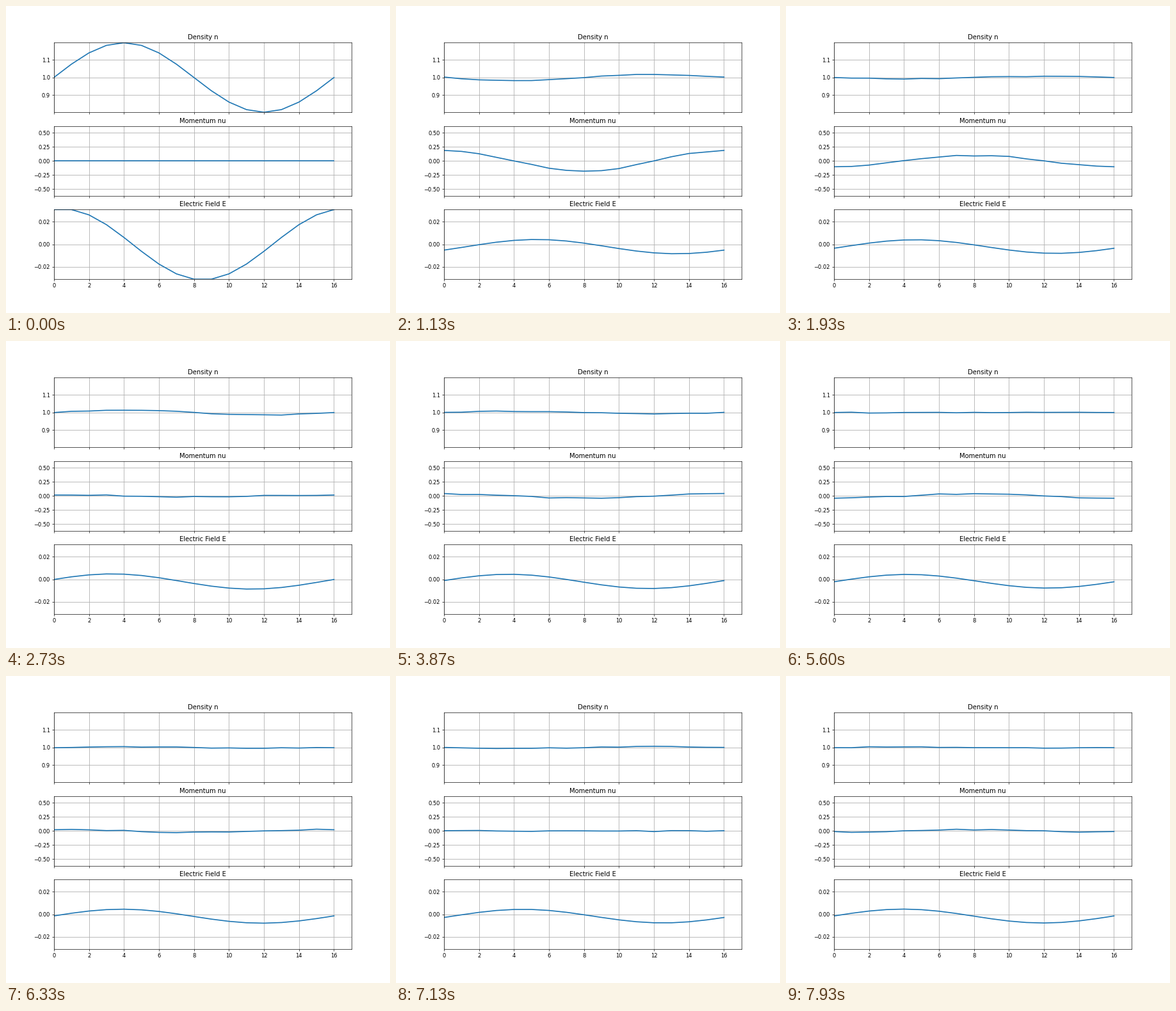
A matplotlib script that plays this animation: 600 by 480 pixels, repeating every 8 s.

```python
import numpy as np
import matplotlib.pyplot as plt
from matplotlib.animation import FuncAnimation

STEPS, LOOP = 120, 8000
SUB = 2                     # drawn frames per time step
CELLS = 16
K = 2 * np.pi / CELLS       # wave number per cell
AMP = 0.1974                # initial density perturbation
RATE = 0.338                # phase mixing per step
V = 5.6                     # edge of the flat velocity distribution
E_RATIO = 0.1598            # field amplitude per density amplitude
W, H, DPI = 600, 480, 60
NUDGE = 0.17                # pixels, keeps grid and frames on their pixel rows

x = np.arange(CELLS + 1)
rng = np.random.default_rng(4)

# particle noise: short waves as (mode, frequency, two phases)
WAVES = [(m, RATE * m * rng.uniform(-1, 1), *rng.uniform(0, 2 * np.pi, 2))
         for m in (2, 3, 4, 5, 6, 7)]


def noise(t, which):
    total = sum(np.sin(m * K * x + w * t + ph[which]) for m, w, *ph in WAVES)
    return total / len(WAVES) * (1 - np.exp(-t / 8))


def state(t):
    """Density, momentum and electric field at step t."""
    z = max(RATE * t, 1e-6)
    a = AMP * np.sin(z) / z
    b = AMP * V * (np.cos(z) - np.sin(z) / z) / z
    n = 1 + a * np.sin(K * x) + 0.004 * noise(t, 0)
    nu = b * np.cos(K * x) + 0.018 * noise(t, 1)
    settled = 1 - np.exp(-(t / 6) ** 2)
    drift = -0.0021 + 0.0006 * t / STEPS
    e = E_RATIO * a * np.cos(K * (x - 0.5))
    e += settled * (drift + 0.0061 * np.sin(K * (x - 0.15)))
    return n, nu, e


fig, axes = plt.subplots(3, 1, sharex=True, figsize=(W / DPI, H / DPI), dpi=DPI)
dx, dy = NUDGE / W, NUDGE / H
fig.subplots_adjust(left=0.125 - dx, right=0.9 - dx,
                    bottom=0.11 + dy, top=0.88 + dy)
panels = [("Density n", 1 - AMP, 1 + AMP),
          ("Momentum nu", -0.6176, 0.6176),
          ("Electric Field E", -0.0309, 0.0309)]
lines = []
for ax, (title, low, high) in zip(axes, panels):
    ax.set_title(title)
    ax.set_xlim(0, CELLS + 1)
    ax.set_ylim(low, high)
    ax.grid(color="#b0b0b0", linewidth=1)
    lines += ax.plot(x, np.zeros(len(x)), color="#1f77b4", linewidth=2)


def update(i):
    step = min((i + 1) // SUB, STEPS - 1)
    for line, y in zip(lines, state(step)):
        line.set_ydata(y)
    return lines


anim = FuncAnimation(fig, update, frames=STEPS * SUB,
                     interval=LOOP / (STEPS * SUB),
                     init_func=lambda: update(0), repeat=True, repeat_delay=0)
plt.show()
```
